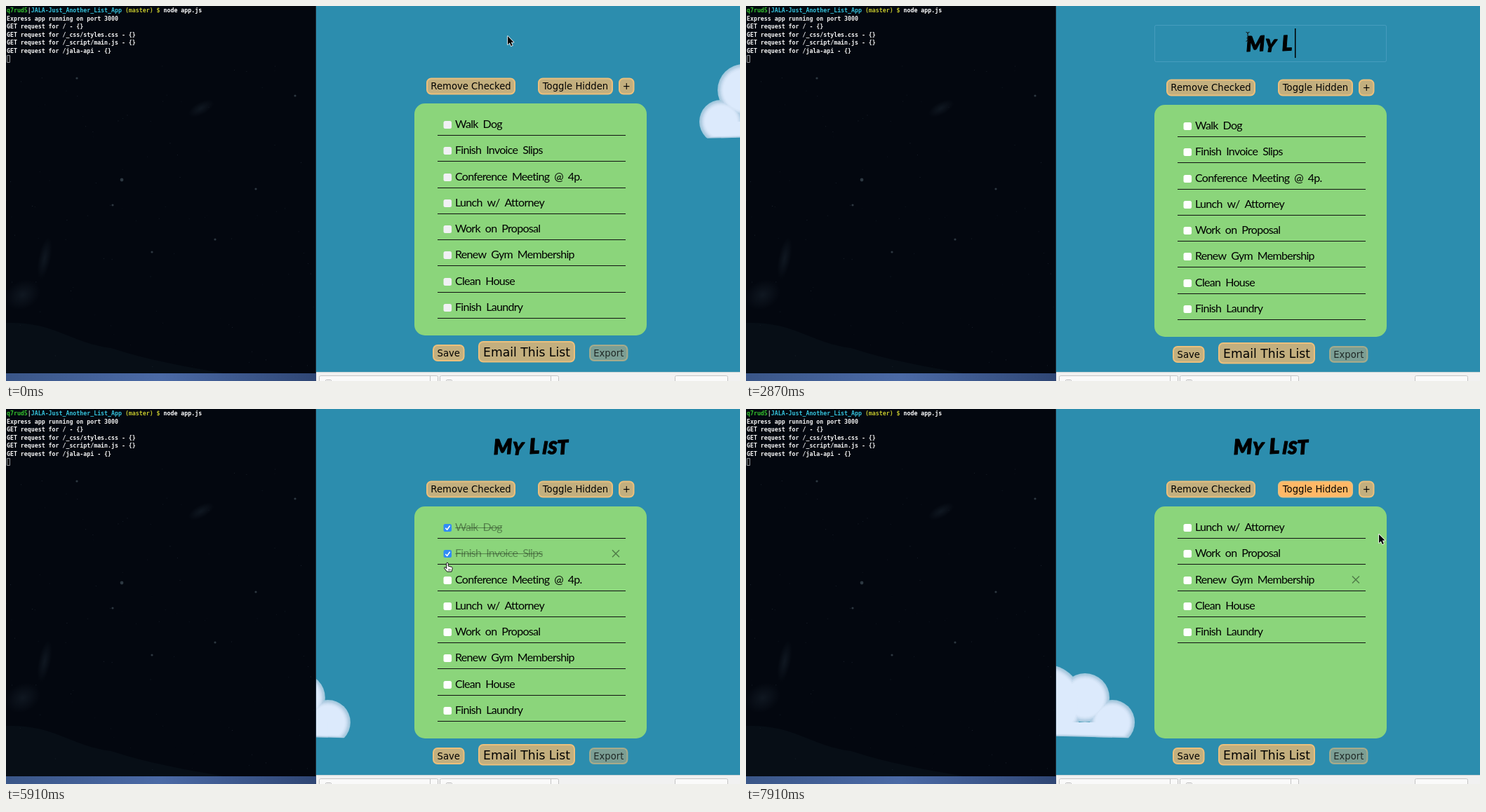
An HTML page with a canvas for the animation above (8 s loop, 1046x535 px).

```html
<!DOCTYPE html>
<html lang="en">
<head>
<meta charset="utf-8">
<title>List app demo</title>
<style>
  html, body { margin: 0; width: 100%; height: 100%; overflow: hidden; background: #2c8dae; }
  canvas { display: block; }
</style>
</head>
<body>
<canvas id="stage" width="1046" height="535"></canvas>
<script>
const ctx = document.getElementById('stage').getContext('2d');
const LOOP = 8000;
const ITEMS = ['Walk Dog', 'Finish Invoice Slips', 'Conference Meeting @ 4p.', 'Lunch w/ Attorney',
  'Work on Proposal', 'Renew Gym Membership', 'Clean House', 'Finish Laundry'];
const CHECK_TIMES = [4780, 5500, 6300];
const FOCUS = 1380, BLUR = 4560, HIDE = 7000;
const ROW_TOP = 147.5, ROW_H = 37.25;

// Title lettering: glyph, advance, size, tilt, baseline offset
const TITLE = [['M', 26, 30, -.04, 1], ['Y', 17, 25, .06, 1], [' ', 8, 25, 0, 0], ['L', 18, 30, -.05, 0],
  ['I', 8, 25, .05, 0], ['S', 14, 25, .03, 0], ['T', 14, 28, -.05, 1]];
const TYPE_TIMES = [2270, 2390, 2510, 2870, 3110, 3350, 3690];

const MOUSE = [[0, 715, 43], [3690, 715, 44], [3810, 748, 118], [3880, 770, 125], [4000, 735, 140],
  [4170, 644, 167], [4450, 629, 170], [5050, 629, 172], [5400, 629, 206], [5700, 629, 208],
  [5910, 629, 219], [6200, 629, 242], [6500, 629, 245], [6920, 787, 118], [7300, 787, 119],
  [7580, 845, 238], [7800, 868, 236], [7910, 902, 179], [8000, 908, 172]];
const TOGGLE_HOVER = [[3850, 0], [3960, .45], [4170, .2], [4500, 0], [6850, 0], [7100, 1]];
const TOGGLE_ACTIVE = [[7220, 0], [7600, 1]];

const TAN = [195, 175, 126], LIGHT = [222, 199, 155], ORANGE = [255, 184, 102];

function track(keys, t) {
  const next = keys.findIndex(k => k[0] > t);
  if (next === 0) return keys[0].slice(1);
  if (next < 0) return keys.at(-1).slice(1);
  const a = keys[next - 1], b = keys[next], p = (t - a[0]) / (b[0] - a[0]);
  return a.slice(1).map((v, i) => v + (b[i + 1] - v) * p);
}
const mix = (a, b, p) => a.map((v, i) => v + (b[i] - v) * p);
const rgb = c => `rgb(${c.map(Math.round)})`;

function rect(x, y, w, h, color) {
  ctx.fillStyle = color;
  ctx.fillRect(x, y, w, h);
}

function rounded(x, y, w, h, r, fill, border, width = 1) {
  ctx.beginPath();
  ctx.roundRect(x, y, w, h, r);
  if (fill) { ctx.fillStyle = fill; ctx.fill(); }
  if (border) { ctx.strokeStyle = border; ctx.lineWidth = width; ctx.stroke(); }
}

function text(str, x, y, font, color, align = 'left') {
  ctx.font = font;
  ctx.textAlign = align;
  ctx.fillStyle = color;
  ctx.fillText(str, x, y);
}

function polyline(points, color, width) {
  ctx.beginPath();
  points.forEach(p => ctx.lineTo(...p));
  ctx.strokeStyle = color;
  ctx.lineWidth = width;
  ctx.stroke();
}

function drawTerminal() {
  const desk = ctx.createLinearGradient(0, 0, 442, 0);
  desk.addColorStop(0, '#3a5688');
  desk.addColorStop(.5, '#4b6aa6');
  desk.addColorStop(1, '#2f4674');
  rect(0, 524, 442, 11, desk);
  rect(0, 0, 442, 524, '#03070f');

  ctx.fillStyle = '#070e16';
  ctx.beginPath();
  ctx.moveTo(0, 452);
  ctx.bezierCurveTo(70, 450, 90, 480, 150, 488);
  ctx.bezierCurveTo(200, 505, 260, 515, 310, 524);
  ctx.lineTo(0, 524);
  ctx.fill();
  for (const [x, y, rx, ry, tilt] of [[24, 412, 26, 20, -.5], [278, 146, 20, 9, -.5], [55, 360, 9, 30, .2]]) {
    ctx.save();
    ctx.translate(x, y);
    ctx.rotate(tilt);
    ctx.scale(rx, ry);
    const haze = ctx.createRadialGradient(0, 0, 0, 0, 0, 1);
    haze.addColorStop(0, 'rgba(60,80,95,.22)');
    haze.addColorStop(1, 'rgba(60,80,95,0)');
    rect(-1, -1, 2, 2, haze);
    ctx.restore();
  }

  let seed = 11;
  const random = () => (seed = seed * 16807 % 2147483647) / 2147483647;
  for (let i = 0; i < 110; i++) {
    rect(random() * 438, 85 + random() * 430, 1, 1, `rgba(120,140,155,${random() * .25})`);
  }
  for (const [x, y] of [[165, 248], [101, 103], [152, 284], [412, 128], [356, 261], [298, 333], [208, 351]]) {
    ctx.beginPath();
    ctx.arc(x, y, x === 165 ? 2.4 : 1.6, 0, 7);
    ctx.fillStyle = 'rgba(110,130,140,.4)';
    ctx.fill();
  }
  rect(441, 0, 1, 524, '#1d2a36');

  const mono = 'bold 8.25px "DejaVu Sans Mono", monospace';
  let x = 1;
  for (const [part, color] of [['q7rud5', '#35c52e'], ['|', '#ddd'], ['JALA-Just_Another_List_App', '#35c3dc'],
    [' (master)', '#c3c52c'], [' $', '#c3c52c'], [' node app.js', '#fff']]) {
    text(part, x, 9, mono, color);
    x += ctx.measureText(part).width;
  }
  ['Express app running on port 3000', 'GET request for / - {}', 'GET request for /_css/styles.css - {}',
    'GET request for /_script/main.js - {}', 'GET request for /jala-api - {}']
    .forEach((line, i) => text(line, 1, 20.5 + i * 11.55, mono, '#f4f4f4'));
  rounded(1.5, 70.5, 4, 10, 0, null, '#8b8f94');
}

function drawCloud(x, lobes, base, slope) {
  const layers = [[0, '#a3c9de'], [2, '#b5cfe4'], [4, '#c8dcf0'], [6, '#d6e5f7'], [8, '#dceafc']];
  for (const [inset, color] of layers) {
    ctx.save();
    ctx.translate(x, 0);
    ctx.beginPath();
    const bottom = base - inset * .4;
    ctx.moveTo(-300, 0);
    ctx.lineTo(300, 0);
    ctx.lineTo(300, bottom + slope * 300);
    ctx.lineTo(-300, bottom - slope * 300);
    ctx.clip();
    ctx.fillStyle = color;
    for (const [cx, cy, r] of lobes) {
      ctx.beginPath();
      ctx.arc(cx, cy, r - inset, 0, 7);
      ctx.fill();
    }
    // Body joining the lobes along the base
    const [first, last] = [lobes[0], lobes.at(-1)];
    ctx.fillRect(Math.min(first[0], last[0]), first[1], Math.abs(first[0] - last[0]), 60);
    ctx.restore();
  }
}

function drawSky(t) {
  rect(442, 0, 604, 535, '#2c8dae');
  ctx.save();
  ctx.beginPath();
  ctx.rect(442, 0, 604, 522);
  ctx.clip();
  if (t < 1110) drawCloud(988 + t * .056, [[31, 165, 31], [63, 120, 37], [115, 110, 55]], 189, -.02);
  if (t > 4000) drawCloud(554 + (t - 7910) * .0316, [[-32, 447, 32], [-71, 412, 35], [-129, 420, 56]], 469.5, .025);
  ctx.restore();
}

function drawDownloads() {
  rect(442, 522, 604, 13, '#f1f1f1');
  rect(442, 522, 604, 1, '#c9d3d6');
  for (const x of [446, 618]) {
    rounded(x + .5, 527.5, 169, 20, 2, '#f9f9f9', '#c4c4c4');
    rect(x + 158, 528, 1, 7, '#c4c4c4');
    rounded(x + 9.5, 533.5, 8, 8, 1, '#fff', '#b5b5b5');
  }
  rounded(953.5, 527.5, 75, 20, 2, '#fafafa', '#c4c4c4');
}

function drawButton(label, x, y, w, h, size = 13.2, fill = rgb(TAN), disabled = false) {
  ctx.globalAlpha = disabled ? .52 : 1;
  rounded(x + 1, y + 1, w - 2, h - 2, 6, fill, '#ecc07c', 2);
  ctx.globalAlpha = disabled ? .75 : 1;
  text(label, x + w / 2, y + h / 2 + size * .37, `${size}px "DejaVu Sans", Verdana, sans-serif`, '#000', 'center');
  ctx.globalAlpha = 1;
}

function drawTitle(t) {
  const typed = TYPE_TIMES.filter(time => time <= t).length;
  const letters = TITLE.slice(0, typed);
  const width = letters.reduce((sum, l) => sum + l[1], 0);
  let x = 747.5 - width / 2;
  const editing = t >= FOCUS && t < BLUR;
  if (editing) rounded(582.5, 27.5, 330, 52, 2, null, 'rgba(130,190,225,.3)');

  ctx.lineJoin = 'round';
  for (const [glyph, advance, size, tilt, drop] of letters) {
    ctx.save();
    ctx.translate(x, 64 + drop);
    ctx.rotate(tilt);
    text(glyph, 0, 0, `italic 900 ${size}px Lato, sans-serif`, '#000');
    ctx.strokeStyle = '#000';
    ctx.lineWidth = 1;
    ctx.strokeText(glyph, 0, 0);
    ctx.restore();
    x += advance;
  }
  const lastKey = typed ? TYPE_TIMES[typed - 1] : FOCUS;
  if (editing && Math.floor((t - lastKey) / 500) % 2 === 0) rect(Math.floor(x), 32, 1.5, 42, '#000');
}

function rowAt(x, y, shift) {
  return x > 615 && x < 883 ? Math.floor((y - ROW_TOP - shift) / ROW_H) : -1;
}

function drawList(t, shift) {
  rounded(582, 139 + shift, 331, 331, 15, '#8bd57b');
  const hidden = t >= HIDE;
  const items = hidden ? ITEMS.slice(3) : ITEMS;
  const hovered = rowAt(...track(MOUSE, t - 90), shift);

  items.forEach((item, i) => {
    const y = 168.5 + shift + i * ROW_H;
    const checked = !hidden && t >= CHECK_TIMES[i];
    rounded(623.5, Math.round(y - 4.5), 11.5, 11, 2.5, checked ? '#318cf5' : t < FOCUS ? '#f1f1f4' : '#fff');
    if (checked) polyline([[626.3, y + 1.2], [628.6, y + 3.7], [632.6, y - 2]], '#fff', 1.6);

    ctx.globalAlpha = checked ? .38 : 1;
    ctx.letterSpacing = '-0.7px';
    ctx.wordSpacing = '3.5px';
    text(item, 640, y + 5.5, '16px Lato, sans-serif', '#000');
    const width = ctx.measureText(item).width;
    ctx.letterSpacing = ctx.wordSpacing = '0px';
    if (checked) rect(640, Math.round(y), width, 1, '#000');
    ctx.globalAlpha = 1;

    rect(615, Math.round(y + 15.5), 268, 1, '#111');
    if (i === hovered) {
      polyline([[864, y - 4.5], [874, y + 5.5]], '#507d49', 1.5);
      polyline([[874, y - 4.5], [864, y + 5.5]], '#507d49', 1.5);
    }
  });
  if (t >= 1200 && t < FOCUS) rect(640, 381, 1, 22, '#000');
}

function drawPage(t) {
  const shift = t >= FOCUS && t < BLUR ? 2 : 0;
  drawSky(t);
  drawTitle(t);
  const toggle = mix(mix(TAN, LIGHT, track(TOGGLE_HOVER, t)[0]), ORANGE, track(TOGGLE_ACTIVE, t)[0]);
  drawButton('Remove Checked', 599, 102.5 + shift, 127, 24);
  drawButton('Toggle Hidden', 758, 102.5 + shift, 107, 24, 13.2, rgb(toggle));
  drawButton('+', 873, 102.5 + shift, 22.5, 24);
  drawList(t, shift);
  drawButton('Save', 608, 483 + shift, 45.5, 24);
  drawButton('Email This List', 673, 478 + shift, 138, 30.5, 17.2);
  drawButton('Export', 831, 483 + shift, 55.5, 24, 13.2, rgb(TAN), true);
  drawDownloads();
}

function drawArrow() {
  const shape = new Path2D('M0 0V12L2.8 9.5L4.8 14L6.8 13.1L4.8 8.7H8.5Z');
  ctx.strokeStyle = '#fff';
  ctx.lineWidth = 1.6;
  ctx.stroke(shape);
  ctx.fillStyle = '#000';
  ctx.fill(shape);
}

function drawBeam() {
  const shape = new Path2D('M-2.5 -6.5Q0 -6.5 0 -4.5Q0 -6.5 2.5 -6.5M0 -5V5M-2.5 6.5Q0 6.5 0 4.5Q0 6.5 2.5 6.5M-1.5 2H1.5');
  ctx.strokeStyle = '#111';
  ctx.lineWidth = 1;
  ctx.stroke(shape);
}

function drawHand() {
  const shape = new Path2D('M-1.5 1Q0 -1 1.2 1V5L6.5 6.5Q7.5 7 7 9L6 13H-.5L-4.5 8Q-4.5 6 -2.5 7L-1.2 8.5Z');
  ctx.fillStyle = '#fff';
  ctx.fill(shape);
  ctx.strokeStyle = '#111';
  ctx.lineWidth = 1;
  ctx.stroke(shape);
  polyline([[2, 9], [2, 11.5]], '#111', .8);
  polyline([[4, 9], [4, 11.5]], '#111', .8);
}

function drawMouse(t) {
  const [x, y] = track(MOUSE, t);
  const onTitle = t > 900 && y < 79;
  const onButton = x > 758 && x < 865 && y > 102 && y < 128;
  const onRow = rowAt(x, y, 0) >= 0;
  ctx.save();
  ctx.translate(x, y);
  if (onButton || (onRow && x < 638)) drawHand();
  else if (onTitle || onRow) drawBeam();
  else drawArrow();
  ctx.restore();
}

function render(now) {
  const t = now % LOOP;
  drawPage(t);
  drawTerminal();
  drawMouse(t);
}

const start = performance.now();
function frame() {
  render(performance.now() - start);
  requestAnimationFrame(frame);
}
frame();
</script>
</body>
</html>
```
